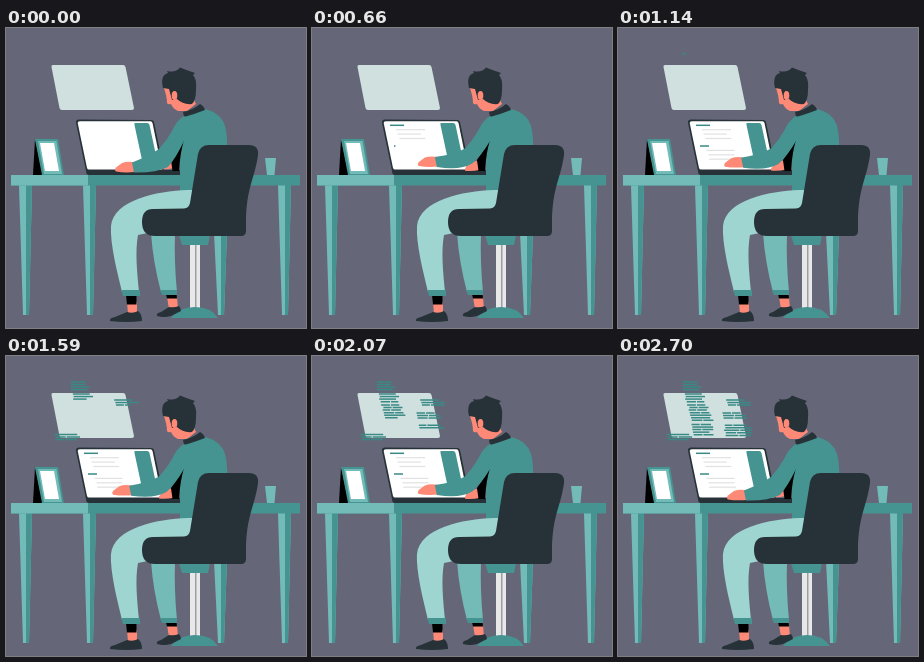
An HTML page that plays this animation: 300 by 300 pixels, repeating every 2730 ms.

```html
<!DOCTYPE html>
<html lang="en">
<head>
<meta charset="utf-8">
<title>Working at a desk</title>
<style>
  html, body { margin: 0; width: 100%; height: 100%; overflow: hidden; background: #656778; }
  svg { display: block; width: 100vw; height: 100vh; }
  .dark { fill: #263238; }
  .teal { fill: #459491; }
  .mid { fill: #72bbb8; }
  .pale { fill: #9fd5d0; }
  .skin { fill: #ff8977; }
  .white { fill: #fff; }
  .row { fill: none; stroke: #398985; stroke-width: 1.5; }
  .faint { stroke: #e0e1e3; stroke-width: 1.2; }
</style>
</head>
<body>
<svg viewBox="0 0 300 300">
  <!-- floating screen -->
  <path fill="#d0e0df" d="M47 37H117Q119 37 119.500 39L128 80Q128 82 126 82H56Q54 82 53.500 80L45.500 39Q45 37 47 37Z"/>
  <g id="code"></g>

  <!-- table -->
  <g id="legs"></g>
  <path class="teal" d="M5 147H294V157.500H5Z"/>
  <path class="mid" d="M5 147H82V157.500H5Z"/>

  <!-- photo frame and cup -->
  <path d="M29 111L37 147H27Z"/>
  <path class="teal" d="M29 111H52L58 147H36Z"/>
  <path class="mid" d="M32 113H50.500L56 146H38Z"/>
  <path class="white" d="M34 115H48L53 143H39Z"/>
  <path class="mid" d="M259 130H270L268.500 147H261Z"/>

  <!-- laptop -->
  <path class="dark" d="M73 91.500L145 92Q147.500 92 148 94L158 142H174V147H83Q80 147 80 143L70 95Q69.500 91.500 73 91.500Z"/>
  <path class="white" d="M74 93.200H144.500Q146 93.200 146.500 95L156 141.500H83Q81.500 141.500 81 140L71.800 95.500Q71.500 93.200 74 93.200Z"/>
  <path class="teal" d="M129 95H141Q143 95 143.500 97L151 132H136L128.500 97Q128 95 129 95Z"/>
  <g id="page"></g>

  <!-- chair stand -->
  <path fill="#e8e8e8" d="M184 215H194V281H184Z"/>
  <path fill="#9a9ea5" d="M189 215H190.500V281H189Z"/>
  <path class="teal" d="M165 290Q173 279 189 279T212 290ZM173 207H204L202 217H176Z"/>

  <!-- far leg -->
  <path class="skin" d="M161 269H171L172 281H163Z"/>
  <path d="M160 266H170.500L171 270.500H161Z"/>
  <path class="dark" d="M163 279Q168 280 173 278Q175 280 175 283L165 288Q158 290 151 288Q150 285 155 284Z"/>
  <path fill="#74bab6" d="M145 205H169Q168 234 171 264H155Q147 234 145 205Z"/>
  <path class="teal" d="M154 262H171V267H156Z"/>

  <!-- body -->
  <path id="farHand" class="skin" d="M153 141Q156 134 165 133L168 142Q160 144 153 143Z"/>
  <path class="teal" d="M178 88L199 81Q215 85 219 98Q222 108 221 130L210 170H174V142Q173 128 177 116L172 104Z"/>
  <path d="M178 112Q174 125 173 143H166.500L165 132Z"/>

  <!-- near leg -->
  <path class="skin" d="M121 274H131V286H122Z"/>
  <path d="M120 267H130.500V276.500H121Z"/>
  <path class="dark" d="M121 284Q127 286 132 283Q136 286 136 293Q120 295 104 293Q103 290 109 289Z"/>
  <path class="pale" d="M190 162H182C150 163 108 172 105 198C104 216 111 243 116 264H133C131 243 129 223 132 207L190 195Z"/>
  <path class="teal" d="M115.500 262H134V268H117Z"/>

  <!-- head -->
  <path class="skin" d="M160 56L158 60Q161 69 161 75Q162 77 165 76Q167 81 172 83H181L190 76L180 56Z"/>
  <path class="dark" d="M157 60Q154 47 162 45L161 43Q170 45 174 39.500Q180 42 189 45L187 47Q191 51 190 62Q190 72 186 76Q177 77 171 71L166 72L163 61Z"/>
  <ellipse class="skin" cx="168.500" cy="67.500" rx="2.800" ry="4.500"/>
  <path class="dark" d="M177 84Q187 82 194 76Q198 78 199 82Q189 86 178 89Z"/>

  <!-- near arm -->
  <path id="nearHand" class="skin" d="M129 134.500Q122 133 116 135L110 139.500Q108 142 110 143.500Q119 145 129 144Z"/>
  <path id="arm" class="teal"/>

  <!-- chair -->
  <path class="dark" d="M203 117H243Q253 117 252 127C249 150 240 160 240 195V203Q240 208 235 208H149Q136 208 136 194Q136 181 147 181L178 180.500Q183 180 184 175L192 126Q194 117 203 117Z"/>
</svg>
<script>
const LOOP = 2730, STROKE = 910, SLANT = 0.22;
const byId = id => document.getElementById(id);
const clamp = v => Math.min(1, Math.max(0, v));

let seed = 7;
const random = () => (seed = seed * 16807 % 2147483647) / 2147483647;

function add(parent, attrs) {
  const el = document.createElementNS("http://www.w3.org/2000/svg", "path");
  for (const name in attrs) el.setAttribute(name, attrs[name]);
  return byId(parent).appendChild(el);
}

function leg(x, top = 157) {
  const side = (cls, left, foot) =>
    add("legs", { class: cls, d: `M${left} ${top}H${x + 13}L${x + 10} 287H${foot}Z` });
  side("mid", x, x + 4);
  side("teal", x + 7, x + 7);
}
[13, 77, 272].forEach(x => leg(x));
leg(208, 205);

// A block of rows typed one after another, leaning like the screen behind it.
const rows = [];
function block({ parent = "code", cls = "row", x, y, count = 1, pitch = 2.55, width, start, step }) {
  for (let i = 0; i < count; i++) {
    const indent = count > 1 ? random() * 2 : 0;
    const length = width * (count > 1 ? 0.8 + 0.3 * random() : 1);
    const gap = parent === "code" && random() < 0.5 ? length * (0.35 + 0.2 * random()) : length;
    rows.push({
      el: add(parent, { class: cls }),
      x: x + i * pitch * SLANT + indent, y: y + i * pitch,
      length, gap, start: start + i * step, step
    });
  }
}

for (const [x, y, width, count, start] of [[78, 97.3, 14, 3, 30], [82, 118, 9, 3, 640]]) {
  const step = 125;
  block({ parent: "page", x, y, width, start, step });
  block({ parent: "page", cls: "row faint", x: x + 6, y: y + 4.4, count, pitch: 4.4, width: 27, start: start + step, step });
}

block({ x: 63, y: 26, count: 4, width: 17, start: 1125, step: 68 });
block({ x: 47, y: 78.5, count: 3, width: 23, start: 1290, step: 95 });
block({ x: 66, y: 38, count: 4, width: 19, start: 1395, step: 70 });
block({ x: 69, y: 49, count: 7, width: 20, start: 1675, step: 70 });
block({ x: 73, y: 68.5, count: 5, width: 20, start: 2165, step: 75 });
block({ x: 107, y: 44, count: 3, width: 22, start: 1395, step: 75 });
block({ x: 104, y: 57, count: 3, width: 22, start: 1620, step: 75 });
block({ x: 105, y: 69.2, count: 5, width: 26, start: 1835, step: 120 });

function draw(now) {
  const t = now % LOOP;

  for (const { el, x, y, length, gap, start, step } of rows) {
    const end = length * clamp((t - start) / step);
    const second = end - gap - 1;
    el.setAttribute("d", end <= 0 ? "" :
      `M${x} ${y}h${Math.min(end, gap)}` + (second > 0 ? `m1 0h${second}` : ""));
  }

  const lift = (1 - Math.cos(t / STROKE * 2 * Math.PI)) / 2;
  const dx = -5.5 * lift, dy = -9.5 * lift;
  byId("nearHand").setAttribute("transform", `translate(${dx} ${dy})`);
  byId("farHand").setAttribute("transform", `translate(0 ${3 * lift - 2})`);
  byId("arm").setAttribute("d",
    `M178 88Q171 92 166 103Q161 112 153 ${121 - lift}` +
    `Q143 ${128 - 3 * lift} ${126 + dx} ${134.5 + dy}L${128 + dx} ${144.5 + dy}` +
    `Q${150 - 3 * lift} ${145 - 4 * lift} ${162 - 3 * lift} ${139 - 6 * lift}` +
    `Q${170 - lift} ${130 - 4 * lift} 178 113L190 96Z`);
}

function tick(now) {
  draw(now);
  requestAnimationFrame(tick);
}
draw(0);
requestAnimationFrame(tick);
</script>
</body>
</html>
```
